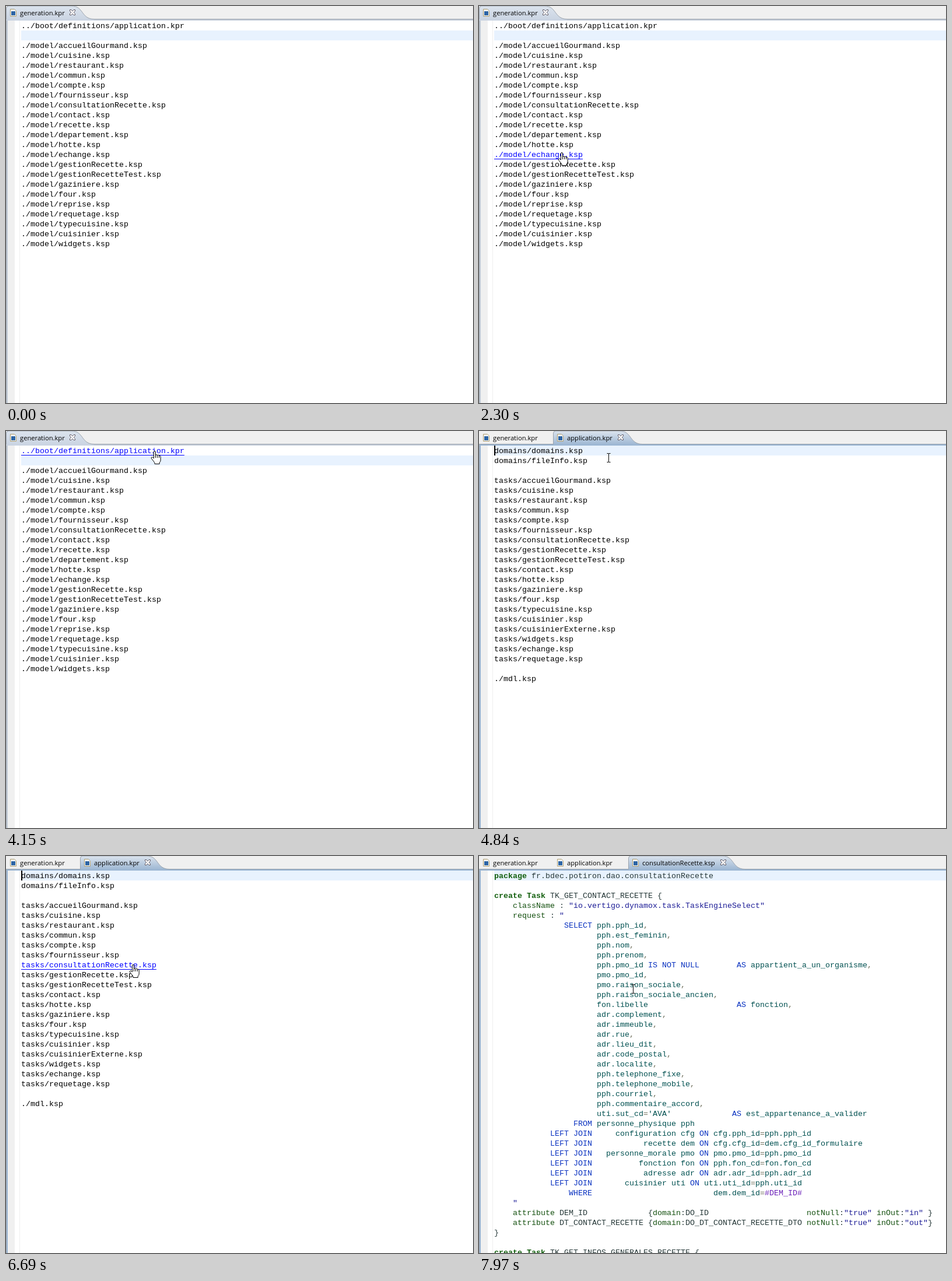
Write an HTML page that moves like this. It is 801 px wide and 681 px high and loops after 8000 ms.

```html
<!DOCTYPE html>
<html lang="fr">
<head>
<meta charset="utf-8">
<title>Editor</title>
<style>
html, body { margin: 0; width: 100%; height: 100%; overflow: hidden; background: #fff; }
#stage { position: relative; width: 801px; height: 681px; overflow: hidden; background: #fff; --edge: #c3ccd8; }
#stage.focus { --edge: #99b4d1; }
#stage > * { position: absolute; }
svg { left: 0; top: 0; overflow: visible; }
#gutter { left: 0; top: 23px; width: 11px; height: 658px; background: #f0f0f0; border-left: 1px solid #a5abb2;
  box-shadow: inset 2px 0 var(--edge); padding-right: 3px; }
#rule { left: 23px; top: 25px; width: 1px; height: 656px; background: #eee; }
#bar { left: 0; top: 0; width: 801px; height: 22px; background: #f0f0f0; border-bottom: 1px solid #9ba3ad; }
#edge { left: 1px; top: 23px; width: 800px; height: 2px; background: var(--edge); }
#band { left: 26px; top: 25px; width: 775px; height: 17px; background: #e8f2fe; }
.page { left: 26px; top: 26px; margin: 0; font: 13.333px/17px "Liberation Mono", "Courier New", monospace; color: #000; }
.page div { position: relative; width: max-content; height: 17px; white-space: pre; }
.link { color: #00f; }
.link::after { content: ""; position: absolute; left: 0; top: 15px; width: 100%; height: 1px; background: #00f; }
#caret { left: 26px; top: 25px; width: 2px; height: 17px; background: #000; }
.code { color: #263838; }
.sql { color: #005050; }
.string { color: #1c1c96; }
.param { color: #6a1fb8; }
.keyword { color: #14600f; font-weight: bold; }
.clause { color: #0a32c0; }
.option { color: #14500f; }
.mark { color: #6c6c58; }
.tab text { font: 11.2px "Open Sans", "Noto Sans", sans-serif; fill: #000; }
</style>
</head>
<body>
<div id="stage">
  <div id="gutter"></div><div id="rule"></div><div id="bar"></div><div id="edge"></div><div id="band"></div>
  <svg id="tabs" width="801" height="26">
    <defs>
      <linearGradient id="calm" x2="0" y2="1"><stop stop-color="#dce4ee"/><stop offset="1" stop-color="#c9d3e1"/></linearGradient>
      <linearGradient id="lit" x2="0" y2="1"><stop stop-color="#dce4ee"/><stop offset="1" stop-color="#99b4d1"/></linearGradient>
    </defs>
  </svg>
  <div id="caret"></div>
  <svg id="cursor" width="1" height="1">
    <g id="hand" fill="#fff" stroke="#000" stroke-linejoin="round" transform="translate(-1 -1)">
      <path d="M-1.5 13V2a1.5 1.5 0 0 1 3 0v6a1.5 1.5 0 0 1 3 .3a1.5 1.5 0 0 1 3 .7a1.5 1.5 0 0 1 2.7.8V16q0 3-2 4v2.5H0V20.5q-2-3-5.5-7.2q-1-2 .8-2.5q1.6 0 3.2 2.2z"/>
      <path d="M1.5 8v4M4.5 8.3v3.7M7.5 9v3" fill="none"/>
    </g>
    <path id="beam" d="M-3-7.5h2.5l.5.5.5-.5H3M0-7V7M-3 7.5h2.5l.5-.5.5.5H3" transform="translate(.5 0)" fill="none" stroke="#000"/>
  </svg>
</div>
<script>
const LOOP = 8000, TICK = 1000 / 13, PHASE = 15, TOP = 25, ROW = 17, LEFT = 26, CHAR = 8;
const FOCUS = 4380, OPEN_APP = 4530, PICK = 6860, OPEN_CODE = 7010, CTRL = 1900;
const $ = id => document.getElementById(id);
const stage = $('stage');

const listing = (folder, names) => names.split(' ').map(name => `${folder}/${name}.ksp`);
const project = ['../boot/definitions/application.kpr', '', ...listing('./model',
  'accueilGourmand cuisine restaurant commun compte fournisseur consultationRecette contact recette departement ' +
  'hotte echange gestionRecette gestionRecetteTest gaziniere four reprise requetage typecuisine cuisinier widgets')];
const application = [...listing('domains', 'domains fileInfo'), '', ...listing('tasks',
  'accueilGourmand cuisine restaurant commun compte fournisseur consultationRecette gestionRecette gestionRecetteTest ' +
  'contact hotte gaziniere four typecuisine cuisinier cuisinierExterne widgets echange requetage'), '', './mdl.ksp'];

const indent = (count, text) => ' '.repeat(count) + text;
const aliased = (column, at, alias) => indent(22, column).padEnd(at) + 'AS ' + alias;
const columns = (prefix, names) => names.split(' ').map(name => indent(22, `${prefix}.${name},`));
const join = (table, alias, rule, end = 39) =>
  indent(12, 'LEFT JOIN') + table.padStart(end - 21) + ` ${alias} ON ${rule}`;
const attribute = (name, domain, flow) =>
  (`    attribute ${name}`.padEnd(33) + `{domain:${domain}`).padEnd(67) + `notNull:"true" inOut:${flow}}`;

const code = [
  'package fr.bdec.potiron.dao.consultationRecette', '',
  'create Task TK_GET_CONTACT_RECETTE {',
  '    className : "io.vertigo.dynamox.task.TaskEngineSelect"',
  '    request : "',
  indent(15, 'SELECT pph.pph_id,'),
  ...columns('pph', 'est_feminin nom prenom'),
  aliased('pph.pmo_id IS NOT NULL', 52, 'appartient_a_un_organisme,'),
  ...columns('pmo', 'pmo_id raison_sociale'),
  ...columns('pph', 'raison_sociale_ancien'),
  aliased('fon.libelle', 52, 'fonction,'),
  ...columns('adr', 'complement immeuble rue lieu_dit code_postal localite'),
  ...columns('pph', 'telephone_fixe telephone_mobile courriel commentaire_accord'),
  aliased("uti.sut_cd='AVA'", 51, 'est_appartenance_a_valider'),
  indent(17, 'FROM personne_physique pph'),
  join('configuration', 'cfg', 'cfg.pph_id=pph.pph_id'),
  join('recette', 'dem', 'cfg.cfg_id=dem.cfg_id_formulaire'),
  join('personne_morale', 'pmo', 'pmo.pmo_id=pph.pmo_id'),
  join('fonction', 'fon', 'pph.fon_cd=fon.fon_cd'),
  join('adresse', 'adr', 'adr.adr_id=pph.adr_id'),
  join('cuisinier', 'uti', 'uti.uti_id=pph.uti_id', 37),
  indent(16, 'WHERE').padEnd(47) + 'dem.dem_id=#DEM_ID#',
  '    "',
  attribute('DEM_ID', 'DO_ID', '"in" '),
  attribute('DT_CONTACT_RECETTE', 'DO_DT_CONTACT_RECETTE_DTO', '"out"'),
  '}', '',
  'create Task TK_GET_INFOS_GENERALES_RECETTE {'
];

const kinds = ['string', 'param', 'keyword', 'clause', 'option', 'mark'];
const tokens = /("[^"]*"?)|(#\w+#)|\b(package|create|Task)\b|\b(SELECT|IS|NOT|NULL|AS|FROM|LEFT|JOIN|ON|WHERE)\b|\b(className|request|attribute|notNull|inOut|domain)\b|([,=])/g;
const paint = line => line.replace(tokens, (text, ...groups) =>
  `<span class="${kinds[groups.findIndex(group => group !== undefined)]}">${text}</span>`);

function addPage(lines, isCode) {
  const page = document.createElement('pre');
  page.className = isCode ? 'page code' : 'page';
  page.innerHTML = lines.map((line, i) =>
    `<div class="${isCode && i > 4 && i < 33 ? 'sql' : ''}">${isCode ? paint(line) : line}</div>`).join('');
  stage.insertBefore(page, $('caret'));
  return { page, lines };
}
const pages = [addPage(project), addPage(application), addPage(code, true)];

const tabs = [
  { left: 0, close: 114, label: 'generation.kpr' },
  { left: 127, close: 243, label: 'application.kpr' },
  { left: 256, close: 419, label: 'consultationRecette.ksp' }
].map(({ left, close, label }) => {
  const group = document.createElementNS('http://www.w3.org/2000/svg', 'g');
  const end = close + 37;
  const outline = `V4q0-4 4-4H${end - 38}C${end - 18} 0 ${end - 22} 22.5 ${end} 22.5`;
  group.setAttribute('class', 'tab');
  group.innerHTML = `
    <g class="active">
      <path class="shape" d="M${left + .5} 25${outline}V25z"/>
      <path d="M${left + .5} 23${outline}" fill="none" stroke="#9ba3ad"/>
      <path transform="translate(${close} 11)" d="M-4.5-4.5h2.5l2 2.3 2-2.3h2.5v2.2L2.2 0l2.3 2.3v2.2H2L0 2.2-2 4.5h-2.5V2.3L-2.2 0l-2.3-2.3z" fill="#fff" stroke="#5c5560"/>
    </g>
    <path d="M${left + 7.5} 5.5h7l3 3v9h-10z" fill="#fff" stroke="#ab9a6b"/>
    <rect x="${left + 9}" y="9" width="7" height="7" fill="#2c64a4"/>
    <text x="${left + 24}" y="16">${label}</text>`;
  $('tabs').append(group);
  return { group, active: group.querySelector('.active'), shape: group.querySelector('.shape') };
});

// Pointer path: time, x, y
const path = [
  [831, 612, 651], [985, 545, 500], [1216, 400, 250], [1446, 295, 90], [1600, 271, 59], [1677, 258, 89],
  [1985, 180, 145], [2446, 125, 306], [2677, 130, 340], [2831, 131, 330], [2908, 132, 284],
  [3139, 130, 183], [3216, 130, 155], [3370, 132, 112], [3523, 132, 112], [3830, 200, 80], [4139, 256, 35],
  [4523, 256, 35], [4900, 215, 48], [5293, 140, 60], [5523, 120, 120], [5754, 116, 183],
  [5985, 118, 237], [6139, 130, 229], [6400, 180, 205], [6677, 219, 187], [7000, 219, 187],
  [7293, 238, 200], [7447, 238, 200], [7908, 264, 228]
];
function pointerAt(time) {
  const next = path.findIndex(key => key[0] > time);
  if (next < 0) return path.at(-1).slice(1);
  const [t0, x0, y0] = path[next - 1], [t1, x1, y1] = path[next];
  const part = (time - t0) / (t1 - t0);
  return [Math.round(x0 + (x1 - x0) * part), Math.round(y0 + (y1 - y0) * part)];
}

const show = (element, visible) => { element.style.display = visible ? '' : 'none'; };
let linked = null;

function render(t) {
  const current = t < OPEN_APP ? 0 : t < OPEN_CODE ? 1 : 2;
  const focused = t >= FOCUS;
  stage.classList.toggle('focus', focused);
  pages.forEach(({ page }, i) => show(page, i === current));
  tabs.forEach(({ group, active, shape }, i) => {
    show(group, i <= current);
    show(active, i === current);
    shape.setAttribute('fill', focused ? 'url(#lit)' : 'url(#calm)');
  });
  const bandRow = !focused ? 1 : t >= PICK && t < OPEN_CODE ? 9 : 0;
  $('band').style.top = TOP + ROW * bandRow + 'px';
  show($('caret'), t >= OPEN_APP && t < PICK || t >= OPEN_CODE && t < 7490);

  const time = Math.floor((t + PHASE) / TICK + 1e-6) * TICK - PHASE;
  const moving = time >= path[0][0];
  show($('cursor'), moving);
  const [x, y] = moving ? pointerAt(time) : [0, 0];
  const row = Math.floor((y - TOP) / ROW);
  const line = pages[current].lines[row] || '';
  const hover = t >= CTRL && current < 2 && x >= LEFT && x < LEFT + line.length * CHAR;
  if (linked) linked.classList.remove('link');
  linked = hover ? pages[current].page.children[row] : null;
  if (linked) linked.classList.add('link');
  $('cursor').style.transform = `translate(${x}px, ${y}px)`;
  show($('hand'), hover);
  show($('beam'), !hover);
}

const start = performance.now();
function frame() {
  render((performance.now() - start) % LOOP);
  requestAnimationFrame(frame);
}
frame();
</script>
</body>
</html>
```
